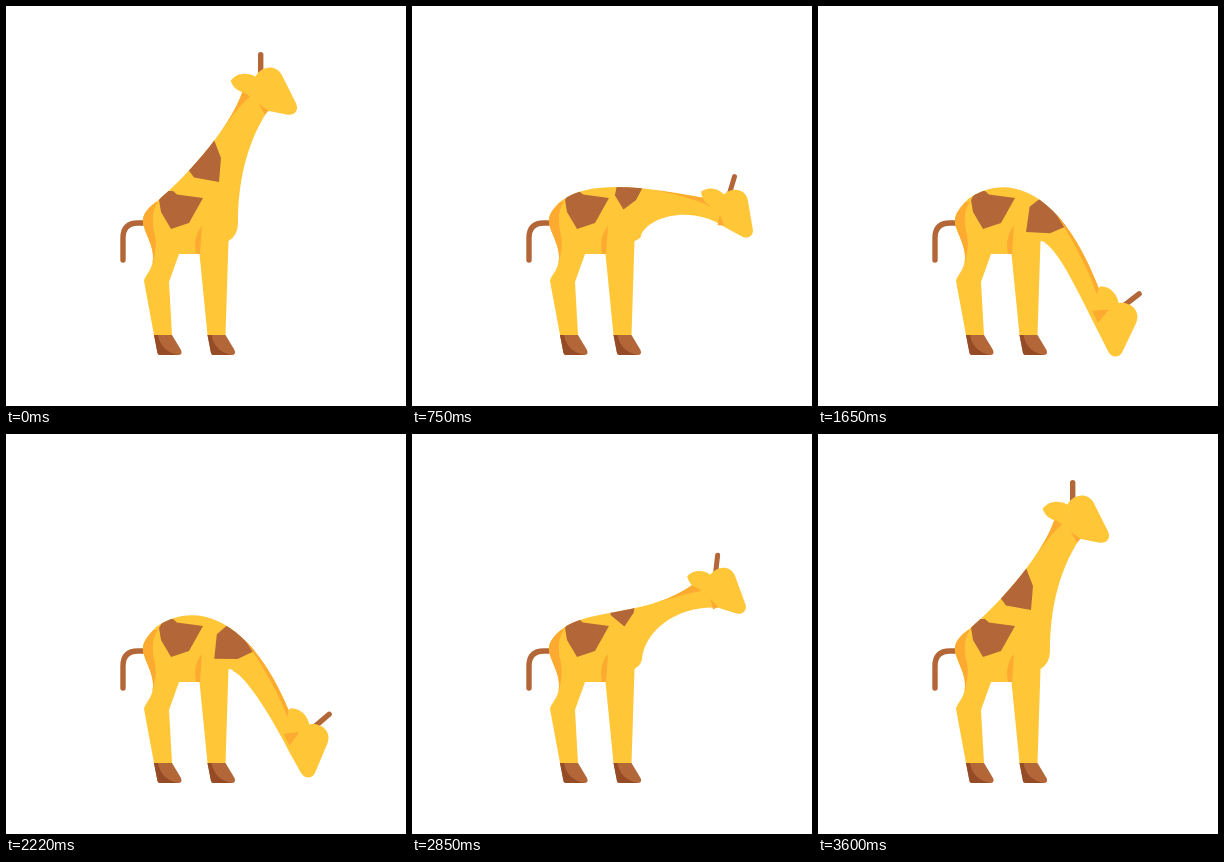
Write an HTML page that moves like this. It is 400 px wide and 400 px high and loops after 4630 ms.

```html
<!DOCTYPE html>
<html lang="en">
<head>
<meta charset="utf-8">
<title>Grazing giraffe</title>
<style>
  html, body { margin: 0; width: 100%; height: 100%; overflow: hidden; background: #fff; }
  svg { display: block; width: 100vw; height: 100vh; }
  .coat { fill: #ffc738; }
  .shade { fill: #fdab30; }
  .brown { fill: #b36738; }
  .dark { fill: #944b26; }
  .line { fill: none; stroke: #b36738; stroke-width: 5.4; stroke-linecap: round; }
</style>
</head>
<body>
<svg viewBox="0 0 400 400">
  <defs>
    <clipPath id="clip"><path id="clipBody"/></clipPath>
    <g id="hoof">
      <path class="brown" d="M148 329H166L175 344Q177 349 172 349H154Q152 349 151.500 347Z"/>
      <path class="dark" d="M148 329H152C154 340 160 346 172 349H154Q152 349 151.500 347Z"/>
    </g>
  </defs>
  <path class="line" d="M138 217H132Q117 217 117 232V254"/>
  <path id="body" class="coat"/>
  <g clip-path="url(#clip)">
    <path class="shade" d="M152 196C146 204 146 214 148 225C151 236 150 244 147 256H130V196Z"/>
    <path class="shade" d="M196 220C189 228 188 238 190 248H194Z"/>
    <path class="brown" d="M153 194L158 185H167L171 188.500L197 192L183 217L165 223L155 206Z"/>
    <path id="patch" class="brown" d="M0 0L2 -24L-8 -50L-45 -30L-32 -14L-25 -4.500Z"/>
    <path id="mane" class="shade"/>
  </g>
  <use href="#hoof"/>
  <use href="#hoof" x="53.5"/>
  <!-- head space has its origin at the foot of the horn -->
  <g id="head">
    <path class="line" d="M0 -16V2"/>
    <g class="coat" transform="translate(-255 -66)">
      <path d="M249 73C255 61 270 59 276 70L290 98C294 105 289 111 282 110L262 106Q254 100 249 87Z"/>
      <path d="M225 76C232 67 243 68 250 72H258V90L249 86C241 90 229 88 225 76Z"/>
    </g>
    <path id="jaw" class="shade"/>
  </g>
</svg>
<script>
const LOOP = 4630, STEP = 30, RAD = Math.PI / 180;
const $ = id => document.getElementById(id);

const clamp = v => Math.min(1, Math.max(0, v));
const mix = (a, b, k) => a.map((v, i) => v + (b[i] - v) * k);
const polar = ([x, y], r, deg) => [x + r * Math.cos(deg * RAD), y + r * Math.sin(deg * RAD)];
const place = ([x, y], deg, scale) => `translate(${x} ${y}) rotate(${deg}) scale(${scale})`;

// ease in and out; lean > 1 moves the fast part earlier
function ease(t, lean, power) {
  const w = 1 - (1 - clamp(t)) ** lean;
  const a = w ** power, b = (1 - w) ** power;
  return a / (a + b);
}

// 0 = neck upright, 1 = muzzle on the ground
const lowered = ms => ms < 2100
  ? ease(ms / 1650, 1.26, 1.5)
  : 1 - ease((ms - 2100) / 1500, 1.33, 1.7);

function draw(ms) {
  const u = lowered(ms);
  const bend = Math.sin(Math.PI * u);

  // the head swings around the shoulder, nearest to it halfway
  const reach = 119 + 27 * (2 * u - 1) ** 2;
  const head = polar([200, 200], reach, -68 + 110 * u);
  const tilt = 52 * u ** 1.9, size = 1 - 0.08 * bend;
  const onHead = (x, y) => polar(head, size * Math.hypot(x, y), tilt + Math.atan2(y, x) / RAD);

  // back of the neck
  const rump = [150, 196 - 3 * u];
  const b1 = [172 + 18 * u, 178 - 13 * u];
  const b2 = [223 + u * (20 + 25 * bend), 184 - 58 * (1 - u) ** 10];
  const nape = onHead(-18 - 12 * u, 20 - 8 * u);

  // front of the neck
  const throat = onHead(7, 40);
  const f1 = polar(throat, 42, 123 + 120 * Math.sin(u * Math.PI / 2));
  const f2 = [232 + 10 * u, 180 + 66 * u ** 1.3];
  const chest = [232 - 5 * u, 217 + 20 * u * u * (3 - 2 * u)];

  const outline = `M${rump}C142 202 136 208 137 217C139 228 148 240 147 253`
    + `C146 265 139 269 138 275L148 329H166L163 276L173 248H193.5L201.500 329H219.500L222.500 235`
    + `Q${chest[0]} ${(chest[1] + 470) / 3} ${chest}`
    + `C${f2} ${f1} ${throat}L${onHead(10, 20)}L${nape}C${b2} ${b1} ${rump}Z`;
  $('body').setAttribute('d', outline);
  $('clipBody').setAttribute('d', outline);

  // shade along the upper part of the back curve
  const k = 0.66;
  const m1 = mix(b1, b2, k), m2 = mix(b2, nape, k), n = mix(m1, m2, k);
  const start = mix(mix(mix(rump, b1, k), m1, k), n, k);
  const inner = mix(nape, throat, 0.3);
  $('mane').setAttribute('d', `M${start}C${n} ${m2} ${nape}L${inner}Q${mix(m2, inner, 0.25)} ${start}Z`);

  const turned = tilt / 37;
  const jaw = [mix([-2, 33], [-5, 22], turned), mix([8, 40], [0.6, 36], turned), mix([4, 44], [-10, 35], turned)];
  $('jaw').setAttribute('d', `M${jaw.join('L')}Z`);

  $('patch').setAttribute('transform', place([213 - 5 * u * u, 176 + 50 * u], 88 * u, 1 - 0.35 * bend));
  $('head').setAttribute('transform', place(head, tilt, size));
}

function tick() {
  draw(Math.floor(performance.now() % LOOP / STEP) * STEP);
  requestAnimationFrame(tick);
}
tick();
</script>
</body>
</html>
```
